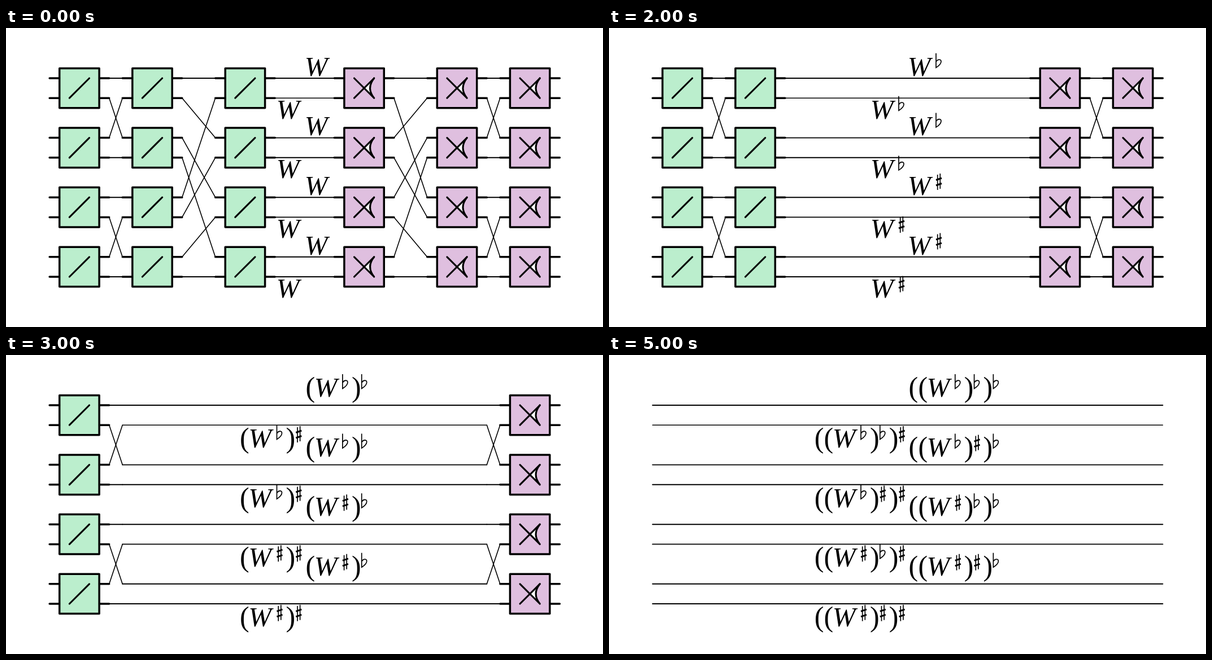
Recreate the animation shown at these times as an HTML page. Size 1057 by 530 pixels, loop 6000 ms.

```html
<!DOCTYPE html>
<html lang="en">
<head>
<meta charset="utf-8">
<title>Wire diagram</title>
<style>
  html, body { margin: 0; width: 100%; height: 100%; overflow: hidden; background: #fff; }
  svg { display: block; }
  path, line { fill: none; stroke: #000; }
  .box { stroke-width: 3.5; stroke-linecap: round; stroke-linejoin: round; }
  .box path { stroke-width: 3.1; }
  .split rect { fill: #bbeecd; stroke: #000; }
  .merge rect { fill: #dfbfdf; stroke: #000; }
  .box .wedge { fill: #fff; stroke: none; }
  .wire { stroke-linecap: round; }
  text { font-family: "Liberation Serif", "Times New Roman", serif; font-size: 50px; }
  .w { font-style: italic; font-size: 49px; }
  .thin { stroke-width: 1.7; }
  .bar { stroke-width: 3; }
</style>
</head>
<body>
<svg id="stage" width="1057" height="530" viewBox="0 0 1057 530"></svg>
<script>
const STEP = 1000, LANES = 8, HALF = 35.2, PORT = 17.6, REACH = HALF + PORT;
const COLUMNS = [129.9, 259, 423.4];

// n: box columns per side, cross: wires swap beyond the last column,
// bits: lane-number bits that give the marks, innermost first
const SCENES = [
  { n: 3, cross: false, bits: [] },
  { n: 2, cross: true,  bits: [0] },
  { n: 2, cross: false, bits: [2] },
  { n: 1, cross: true,  bits: [2, 0] },
  { n: 1, cross: false, bits: [2, 1] },
  { n: 0, cross: false, bits: [2, 1, 0] }
];

const mirror = x => 1057.5 - x;
const rowY = r => 106.6 + 105.6 * r;
const laneY = i => rowY(i >> 1) + (i & 1 ? PORT : -PORT);

function shuffle(i, size) {
  const k = i % size;
  return i - k + (k < size / 2 ? 2 * k : 2 * k - size + 1);
}

function wire(x1, a, x2, b) {
  const width = a !== b ? 1.6 : a === 1 ? 1.4 : 1.9;
  return `<line class="wire" x1="${x1}" y1="${laneY(a)}" x2="${x2}" y2="${laneY(b)}" stroke-width="${width}"/>`;
}

function box(x, row, kind) {
  const p = PORT, curve = `Q3.4 0 ${p} ${p}`;
  const ports = [-p, p].map(y =>
    `<path style="stroke-width:3.5" d="M${-REACH} ${y}H${-HALF}M${HALF} ${y}H${REACH}"/>`).join("");
  const slash = `<path d="M${-p} ${p}L${p} ${-p}"/>`;
  const merge = `<path class="wedge" d="M0 0L${p} ${-p}${curve}Z"/>` +
    `<path d="M${-p} ${-p}L${p} ${p}M${p} ${-p}${curve}"/>`;
  return `<g class="box ${kind}" transform="translate(${x} ${rowY(row)})">${ports}` +
    `<rect x="${-HALF}" y="${-HALF}" width="${2 * HALF}" height="${2 * HALF}"/>` +
    (kind === "merge" ? merge : "") + slash + "</g>";
}

function mark(x, sharp) {
  const shape = sharp
    ? `<path class="thin" d="M3.7-36V-9M8.3-38V-11"/><path class="bar" d="M1-26.5L11-30M1-17L11-20.5"/>`
    : `<path class="thin" d="M1-40V-14.5C5-17 10-21 10-25.5C10-30 4-30 1-25"/>`;
  return `<g transform="translate(${x} 0)">${shape}</g>`;
}

function label(lane, bits) {
  const depth = bits.length, low = lane & 1, nested = depth > 1;
  const left = !low ? 532 : depth ? 466 - 50.4 * (depth - 1) : 482;
  const base = laneY(lane) + (low ? (nested ? 39.8 : 36.6) : (nested ? -15 : -4.2));
  let x = 0, out = "";
  for (let k = 1; k < depth; k++, x += 16.9) out += `<text x="${x - 1.5}">(</text>`;
  out += `<text class="w" x="${x - 3.2}">W</text>`;
  x += 46;
  bits.forEach((bit, k) => {
    if (k) {
      out += `<text x="${x + 17}">)</text>`;
      x += 33.8;
    }
    out += mark(x, lane >> bit & 1);
  });
  return `<g transform="translate(${left} ${base})">${out}</g>`;
}

function scene({ n, cross, bits }) {
  const gaps = cross ? n : Math.max(n - 1, 0);
  const start = cross ? COLUMNS[n] - REACH : n ? COLUMNS[n - 1] + REACH : COLUMNS[0] - REACH;
  let out = "";
  for (let i = 0; i < LANES; i++) {
    out += wire(start, i, mirror(start), i);
    for (let g = 0; g < gaps; g++) {
      const x1 = COLUMNS[g] + REACH, x2 = COLUMNS[g + 1] - REACH;
      const to = shuffle(i, 4 << g);
      out += wire(x1, i, x2, to) + wire(mirror(x1), i, mirror(x2), to);
    }
    out += label(i, bits);
  }
  for (const x of COLUMNS.slice(0, n))
    for (let row = 0; row < LANES / 2; row++)
      out += box(x, row, "split") + box(mirror(x), row, "merge");
  return `<g>${out}</g>`;
}

const stage = document.getElementById("stage");
stage.innerHTML = SCENES.map(scene).join("");

const total = STEP * SCENES.length, share = 1 / SCENES.length;
[...stage.children].forEach((group, i) => group.animate([
  { visibility: "visible", offset: 0 },
  { visibility: "visible", offset: share },
  { visibility: "hidden", offset: share },
  { visibility: "hidden", offset: 1 }
], { duration: total, delay: i ? i * STEP - total : 0, iterations: Infinity }));
</script>
</body>
</html>
```
